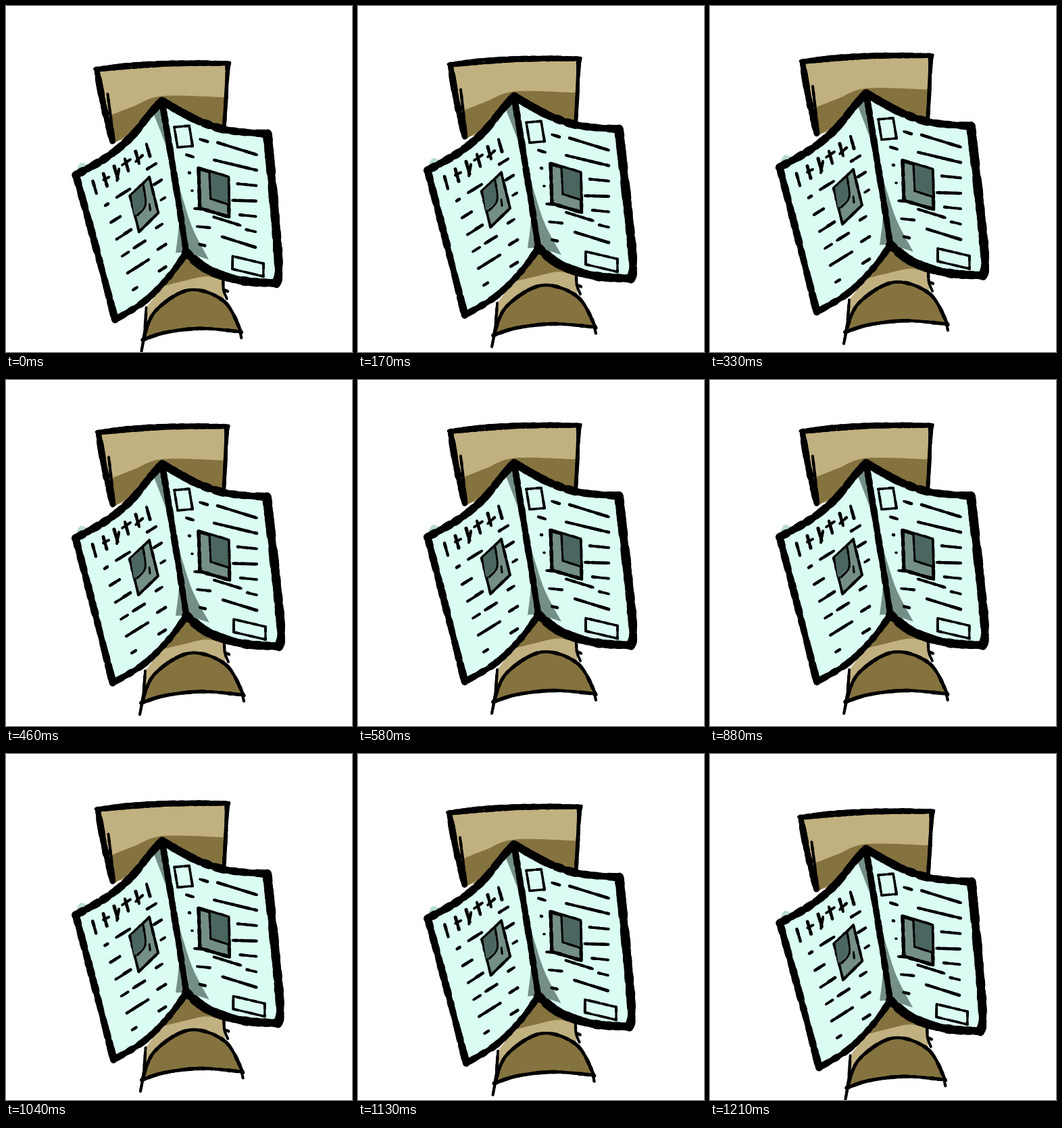
Recreate the animation shown at these times as an HTML page with a canvas. Size 512 px wide and 512 px high, loop 1.25 s.

```html
<!DOCTYPE html>
<html>
<head>
<meta charset="utf-8">
<style>
html, body { margin: 0; width: 100%; height: 100%; overflow: hidden; background: #fff; }
canvas { display: block; width: 100vw; height: 100vh; }
</style>
</head>
<body>
<canvas id="stage" width="512" height="512"></canvas>
<script>
const ctx = document.getElementById('stage').getContext('2d');
const LOOP = 1250, FRAMES = 30, PEAK = 710, LAND = 1208, HEIGHT = 19;
const TAN = '#c1b080', BROWN = '#85733f', PAPER = '#dafcf3', GREY = '#748e88', SLATE = '#4b6660';
let lift, pinch, seed;

const random = () => (seed = seed * 16807 % 2147483647) / 2147483647;

// Places a point: vertical hop, plus a slight narrowing towards the feet on landing.
const place = ([x, y]) => [x - pinch * 1.5e-4 * (x - 256) * (y - 215), y + 18.2 - lift];

// Samples a Catmull-Rom spline through a few key points.
function curve(text) {
  const keys = text.split(' ').map(pair => pair.split(',').map(Number));
  const key = i => keys[Math.max(0, Math.min(keys.length - 1, i))];
  const points = [keys[0]];
  for (let i = 0; i < keys.length - 1; i++) {
    const [a, b, c, d] = [-1, 0, 1, 2].map(k => key(i + k));
    const count = Math.ceil(Math.hypot(c[0] - b[0], c[1] - b[1]) / 4);
    for (let n = 1; n <= count; n++) {
      const t = n / count;
      points.push([0, 1].map(k => b[k] + t / 2 * (c[k] - a[k]
        + t * (2 * a[k] - 5 * b[k] + 4 * c[k] - d[k]
        + t * (3 * (b[k] - c[k]) + d[k] - a[k])))));
    }
  }
  return points;
}

function fill(color, ...curves) {
  ctx.beginPath();
  curves.flatMap(curve).map(place).forEach(p => ctx.lineTo(...p));
  ctx.fillStyle = color;
  ctx.fill();
}

// Brush line with a slightly uneven width.
function ink(width, ...curves) {
  for (const text of curves) {
    const points = curve(text).map(place);
    for (let i = 1; i < points.length; i++) {
      ctx.lineWidth = width * (0.85 + 0.3 * random());
      ctx.beginPath();
      ctx.moveTo(...points[i - 1]);
      ctx.lineTo(...points[i]);
      ctx.stroke();
    }
  }
}

// Box from a corner and its two side vectors, optionally filled.
function box(x, y, [ax, ay], [bx, by], width, color) {
  const corners = [[x, y], [x + ax, y + ay], [x + ax + bx, y + ay + by], [x + bx, y + by]].map(p => p.join());
  if (color) fill(color, ...corners);
  if (width) corners.forEach((p, i) => ink(width, p + ' ' + corners[(i + 1) % 4]));
}

// One dash per length, stepping down the page; negative lengths run leftwards.
function dashes(x, y, dx, dy, slope, lengths) {
  lengths.forEach((length, i) => {
    const left = x + i * dx, top = y + i * dy;
    ink(4.2, `${left},${top} ${left + length},${top + length * slope(i)}`);
  });
}

function drawHat() {
  const top = '134,75 190,68 265,65 329,66', right = '326,66 325,110 322,165', left = '158,182 146,130 137,78';
  fill(TAN, top, right, left);
  fill(BROWN, '157,143 190,130 232,115 324,117', '322,165 232,150 160,185');
  ink(5.5, top, right);
  ink(9, left);
  ink(4, '140,77 230,70 329,68', '152,112 160,180', '329,66 324,115');
}

function drawFoot() {
  const arch = '201,475 220,433 272,402 325,419 352,465', sole = '352,464 290,459 235,465 200,476';
  fill(TAN, '201,472 206,428', '267,350 323,386', '325,418 272,405');
  fill(BROWN, '225,398 262,389 296,382 323,387', '267,350');
  fill(BROWN, arch, sole);
  ink(5, arch, sole);
  ink(4, '206,428 203,465 198,493', '323,386 324,402 329,415', '326,402 330,404', '350,464 352,473');
}

function drawPaper() {
  const spine = '231,122 249,233 267,347';
  const topLeft = '103,232 150,205 185,176 213,142 231,122', leftEdge = '158,446 131,340 103,232';
  const bottomLeft = '267,347 240,383 203,419 158,446';
  const topRight = '231,122 258,138 290,154 330,166 386,171', rightEdge = '386,171 400,295 407,370 404,393';
  const bottomRight = '404,392 350,388 300,372 267,347';
  fill('#b9dcd2', '102,229 110,214 122,218');
  fill(PAPER, topLeft, bottomLeft, leftEdge);
  fill(PAPER, topRight, rightEdge, bottomRight);
  fill(GREY, '219,142 237,190 250,237', '232,124');
  fill(GREY, '252,255 256,300 251,347', '267,346');
  fill(GREY, '246,215 262,268 277,312 301,357', '267,346');
  ink(11, topLeft, topRight);
  ink(10, leftEdge);
  ink(12.5, rightEdge, bottomRight);
  ink(9, spine, bottomLeft);
}

function drawLeftPage() {
  const rise = () => -0.62;
  for (let i = 0; i < 6; i++) {
    const x = 128 + 16 * i, y = 241 - 11 * i;
    ink(4.5, `${x},${y} ${x + 5},${y + 18}`);
  }
  ink(4, '144,239 152,235', '164,240 167,223', '172,217 184,209', '192,212 202,203');
  dashes(146, 277, 8, 25, rise, [4, 14, 17, 10, 32, 6]);
  dashes(163, 265, 14, 25, rise, [20]);
  dashes(174, 319, 14, 21, rise, [10, 17]);
  dashes(209, 223, 10, 23, rise, [13, 11, 6]);
  dashes(222, 310, 2, 32, rise, [9, 12, 10]);
  box(183, 263, [29, -28], [13, 53], 4, GREY);
  box(185, 262, [18, -16], [4, 30], 0, SLATE);
  ink(3, '203,247 206,276 194,291', '212,275 213,284');
}

function drawRightPage() {
  const fall = i => 0.17 + 0.14 * Math.cos(i * Math.PI / 3);
  dashes(371, 202, 0, 22.8, fall, [-58, -63, -28, -35, -24, -14, -50]);
  dashes(267, 202, 4, 26.5, fall, [10, 1, 1, 12, 19, 8]);
  dashes(287, 179, 0, 0, fall, [11]);
  dashes(308, 294, 0, 0, fall, [40]);
  box(249, 161, [22, -2], [5, 30], 3.5);
  box(337, 352, [47, 11], [0, 19], 3.5);
  box(285, 222, [44, 13], [2, 59], 5, GREY);
  box(302, 228, [26, 8], [1, 40], 0, SLATE);
  ink(3, '301,228 303,267', '303,267 328,275');
}

function pose(t) {
  if (t < PEAK) {
    lift = HEIGHT * Math.sin(t / PEAK * Math.PI / 2);
    pinch = Math.max(0, 1 - t / 170);
  } else {
    pinch = Math.min(1, (t - PEAK) / (LAND - PEAK)) ** 2.4;
    lift = HEIGHT * (1 - pinch);
  }
}

function render() {
  const step = Math.floor(performance.now() % LOOP * FRAMES / LOOP + 0.05) % FRAMES;
  pose(step * LOOP / FRAMES);
  seed = 7;
  ctx.fillStyle = '#fff';
  ctx.fillRect(0, 0, 512, 512);
  ctx.strokeStyle = '#000';
  ctx.lineCap = 'round';
  drawHat();
  drawFoot();
  drawPaper();
  drawLeftPage();
  drawRightPage();
  requestAnimationFrame(render);
}
render();
</script>
</body>
</html>
```
